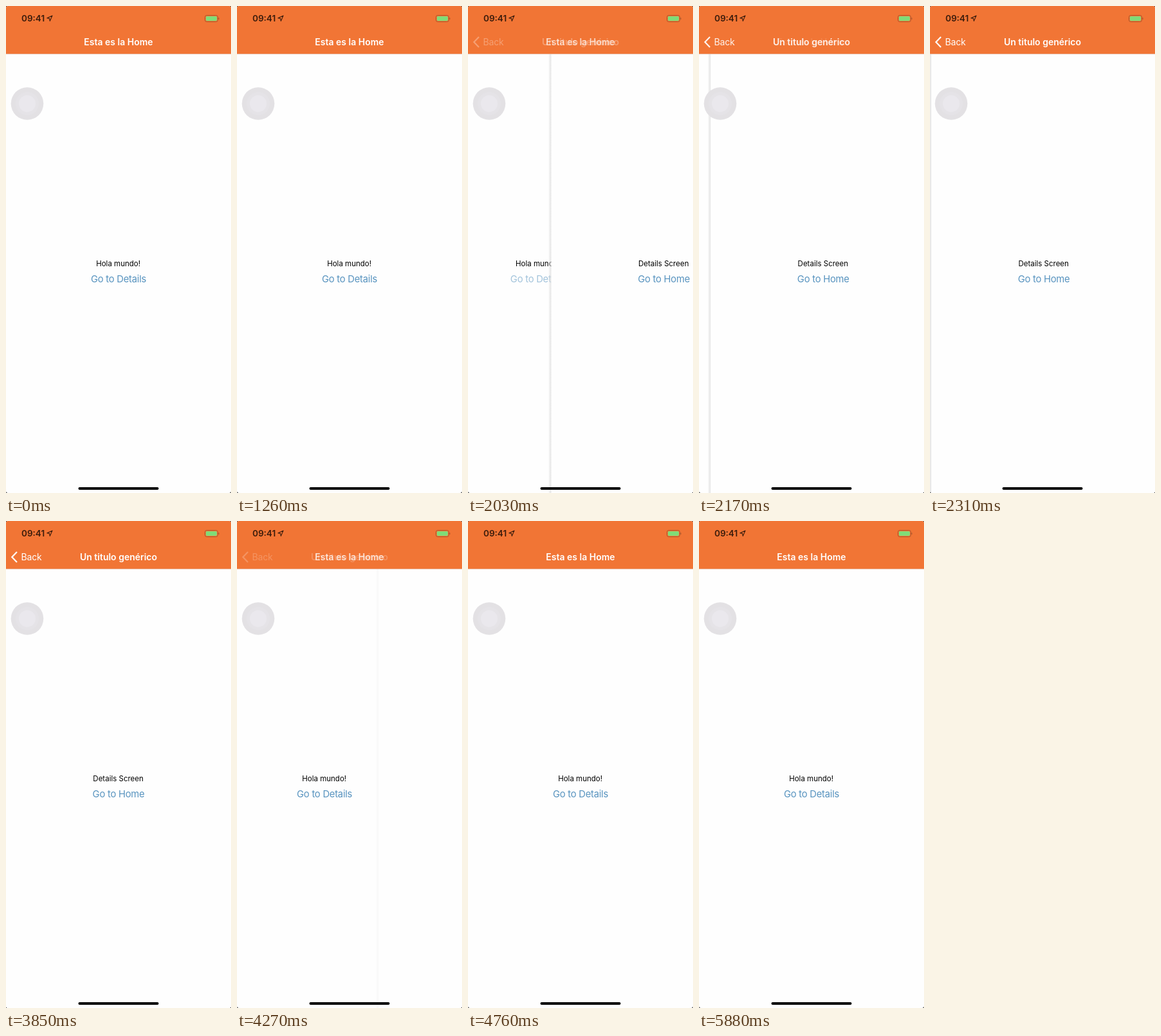
These frames come from a looping animation (350x756 px, 5.95 s). An HTML page:

```html
<!DOCTYPE html>
<html lang="es">
<head>
<meta charset="utf-8">
<title>Home and details</title>
<style>
  html, body { margin: 0; width: 100%; height: 100%; overflow: hidden; background: #222; }
  svg { display: block; width: 350px; height: 756px; border-radius: 3px; }
  text { font-family: Inter, Roboto, sans-serif; text-anchor: middle; }
  .title { font-size: 14px; font-weight: 600; fill: #fff; }
  .label { font-size: 11.5px; fill: #000; }
  .link { font-size: 14.8px; letter-spacing: -.25px; fill: #5793bf; }
  .back { font-size: 14px; letter-spacing: -.15px; fill: #fff; text-anchor: start; }
  .clock { font-size: 13.5px; font-weight: 600; fill: #3b1c0c; text-anchor: start; }
</style>
</head>
<body>
<svg viewBox="0 0 350 756">
  <defs>
    <linearGradient id="shade">
      <stop offset="0" stop-color="#ddd" stop-opacity=".25"/>
      <stop offset="1" stop-color="#ddd" stop-opacity=".8"/>
    </linearGradient>
  </defs>
  <rect width="350" height="756" fill="#fefefe"/>

  <g id="home">
    <text class="label" x="174.6" y="404">Hola mundo!</text>
    <text class="link" id="homeLink" x="175" y="429">Go to Details</text>
  </g>

  <g id="details">
    <rect id="edge" x="-4" y="75" width="4" height="681" fill="url(#shade)"/>
    <rect y="75" width="350" height="681" fill="#fefefe"/>
    <text class="label" x="174.6" y="404">Details Screen</text>
    <text class="link" id="detailsLink" x="175" y="429">Go to Home</text>
  </g>

  <rect width="350" height="74" fill="#f17535"/>
  <rect y="74" width="350" height="1" fill="#e9b79f"/>
  <g id="detailsBar">
    <path d="M17 48 L9.3 56 L17 64" fill="none" stroke="#fff" stroke-width="2.2"/>
    <text class="back" x="23.5" y="61">Back</text>
    <text class="title" x="175" y="61">Un titulo genérico</text>
  </g>
  <text class="title" id="homeTitle" x="175" y="61">Esta es la Home</text>

  <text class="clock" x="24" y="24.2">09:41</text>
  <path d="M72 15 L63.8 18.8 L67.6 19.4 L68.3 23.4 Z" fill="none" stroke="#3b1c0c" stroke-width="1.1" stroke-linejoin="round"/>
  <rect x="309.5" y="14.5" width="20" height="10" rx="2.8" fill="none" stroke="#a9562c"/>
  <rect x="311" y="16" width="17" height="7" rx="1.4" fill="#80dc78"/>
  <path d="M331 18 v3" stroke="#a9562c"/>

  <circle cx="33" cy="151.5" r="25.3" fill="#e3e1e4"/>
  <circle cx="33" cy="151.5" r="18" fill="#e5e3e7"/>
  <circle cx="33" cy="151.5" r="13" fill="#eae8ed"/>
  <rect x="112.5" y="747" width="125" height="4" rx="2" fill="#000"/>
</svg>
<script>
  const LOOP = 5950, STEP = 70, WIDTH = 350, PARALLAX = 105;
  const PUSH = 1913, POP = 4153;
  const $ = id => document.getElementById(id);
  const parts = {};
  for (const id of ['home', 'details', 'edge', 'homeLink', 'detailsLink', 'detailsBar', 'homeTitle'])
    parts[id] = $(id);

  // Critically damped spring, 0 to 1.
  function spring(ms) {
    if (ms <= 0) return 0;
    const x = Math.sqrt(1000 / 3) * ms / 1000;
    return 1 - Math.exp(-x) * (1 + x);
  }

  // Link dims while held, then eases back after release.
  function linkOpacity(t, release) {
    const k = (t - release) / 250;
    if (t < release - 95 || k >= 1) return 1;
    if (k <= 0) return .2;
    const ease = k < .5 ? 2 * k * k : 1 - 2 * (1 - k) ** 2;
    return .2 + .8 * ease;
  }

  function barOpacity(p) {
    const points = [[0, 0], [.374, .22], [.629, .3], [1, 1]];
    const i = Math.max(1, points.findIndex(q => p <= q[0]));
    const [x0, y0] = points[i - 1], [x1, y1] = points[i];
    return y0 + (y1 - y0) * (p - x0) / (x1 - x0);
  }

  function shift(el, x) {
    el.setAttribute('transform', `translate(${x.toFixed(2)} 0)`);
  }

  function draw(t) {
    const popping = t >= POP;
    const p = popping ? 1 - spring(t - POP) : spring(t - PUSH);
    const bar = barOpacity(p);
    shift(parts.home, -PARALLAX * p);
    shift(parts.details, WIDTH * (1 - p));
    parts.details.style.display = p < .001 ? 'none' : '';
    parts.edge.style.opacity = popping ? .25 : 1;
    parts.homeLink.style.opacity = linkOpacity(t, PUSH);
    parts.detailsLink.style.opacity = linkOpacity(t, POP);
    parts.detailsBar.style.opacity = bar;
    parts.homeTitle.style.opacity = 1 - bar;
  }

  const start = performance.now();
  function tick() {
    const t = (performance.now() - start) % LOOP;
    draw(Math.floor(t / STEP) * STEP);
    requestAnimationFrame(tick);
  }
  draw(0);
  requestAnimationFrame(tick);
</script>
</body>
</html>
```
